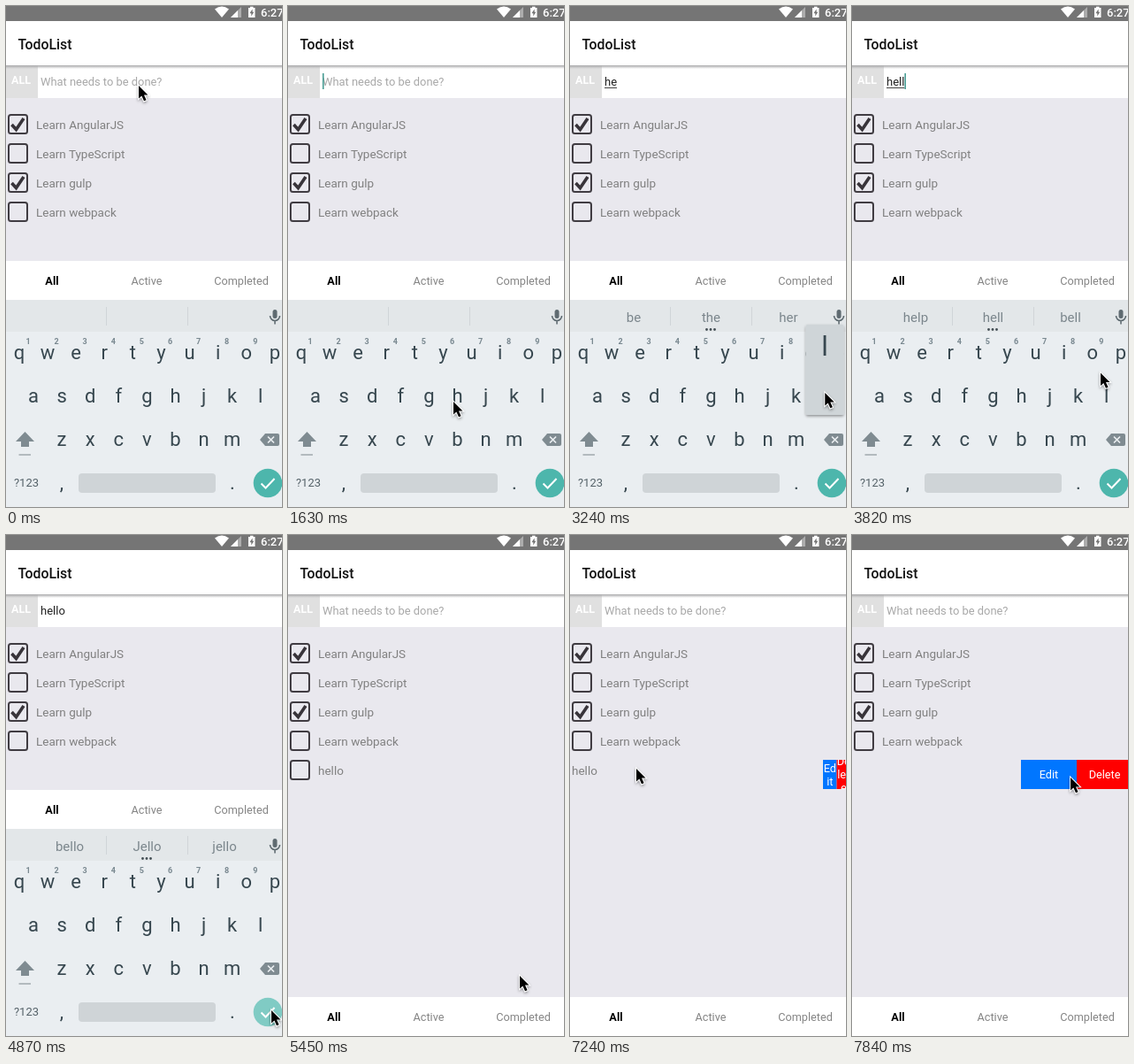
An HTML page for the animation above (7990 ms loop, 312 px wide and 566 px high).

```html
<!DOCTYPE html>
<html lang="en">
<head>
<meta charset="utf-8">
<title>Todo list</title>
<style>
  html, body { margin: 0; width: 100%; height: 100%; overflow: hidden; background: #e9e8ee; }
  svg { display: block; width: 312px; height: 566px; font: 13px Roboto, sans-serif; }
  .mid { text-anchor: middle; }
  .item { font-size: 13.5px; fill: #808080; }
  .key { font-size: 22px; fill: #37474f; text-anchor: middle; }
  .digit { font-size: 9px; font-weight: 700; fill: #78878f; text-anchor: middle; }
  .word { font-size: 15px; fill: #7b868c; text-anchor: middle; }
  .tab { font-size: 12.7px; fill: #858585; text-anchor: middle; }
  .box { fill: none; stroke: #403c42; stroke-width: 2; }
  .tick { fill: none; stroke: #38343a; stroke-width: 3.6; }
  .button { font-size: 12.7px; fill: #fff; text-anchor: middle; }
  #pointer { stroke: #fff; stroke-width: 1.8; paint-order: stroke; }
</style>
</head>
<body>
<svg viewBox="0 0 312 566">
  <defs>
    <clipPath id="rowClip"><rect y="254" width="312" height="33"/></clipPath>
    <filter id="shade" x="-30%" y="-30%" width="160%" height="160%">
      <feDropShadow dx="0" dy="1.5" stdDeviation="1.5" flood-opacity=".4"/>
    </filter>
    <linearGradient id="edge" x2="0" y2="1">
      <stop stop-color="#a9a9ab"/><stop offset="1" stop-color="#a9a9ab" stop-opacity="0"/>
    </linearGradient>
  </defs>

  <rect width="312" height="566" fill="#e9e8ee"/>

  <rect width="312" height="17" fill="#757575"/>
  <g fill="#fff">
    <path d="M244 13L236 3.4Q244-2.6 252 3.4Z"/>
    <path d="M254 13L266 1V13Z" opacity=".4"/>
    <path d="M254 13L262 5V13Z"/>
    <path d="M274 2h2V.8h3.5V2h2v11H274Z"/>
    <path d="M278.6 3.6L275.4 8.2h1.9v3.4l3-4.8h-1.7Z" fill="#757575"/>
    <text x="288" y="12" font-weight="500">6:27</text>
  </g>

  <rect y="17" width="312" height="50" fill="#fff"/>
  <text x="13.500" y="49" font-size="15.800" font-weight="500" fill="#111">TodoList</text>

  <rect y="67" width="36" height="37" fill="#e0e0e0"/>
  <rect x="36" y="67" width="276" height="37" fill="#fff"/>
  <rect y="67" width="312" height="4" fill="url(#edge)"/>
  <text x="6" y="88" font-size="12.500" font-weight="700" fill="#fff">ALL</text>
  <text id="hint" x="39" y="90" font-size="12.900" fill="#a8a8a8">What needs to be done?</text>
  <text id="typed" x="39" y="90" fill="#222"></text>
  <rect id="line" x="39" y="92" height="1" fill="#444"/>
  <rect id="caret" y="76" width="1.6" height="18" fill="#4a9e95"/>

  <g id="list"></g>
  <g id="row" clip-path="url(#rowClip)"></g>

  <g id="tabs">
    <rect width="312" height="44" fill="#fff"/>
    <text class="tab" x="52" y="27" style="fill:#000;font-weight:700">All</text>
    <text class="tab" x="159" y="27">Active</text>
    <text class="tab" x="266" y="27">Completed</text>
  </g>

  <g id="keyboard">
    <rect y="332" width="312" height="234" fill="#eaeef1"/>
    <rect y="332" width="312" height="36" fill="#e3e7e9"/>
    <path d="M113.5 340v21M205.5 340v21" stroke="#d0d5d8"/>
    <g id="words"></g>
    <g fill="none" stroke="#5f6b71" stroke-width="1.6">
      <rect x="301.5" y="343" width="5" height="10" rx="2.5" fill="#5f6b71" stroke="none"/>
      <path d="M298.5 350a5.5 5.5 0 0 0 11 0M304 355.5v4"/>
    </g>
    <g id="keys"></g>
    <path d="M21.5 481L32 492h-6v6h-9v-6h-6Z" fill="#7f8b91"/>
    <path d="M14.5 507h13.500" stroke="#a0a9ae" stroke-width="1.5"/>
    <path d="M287 490l6-7h14a2 2 0 0 1 2 2v10a2 2 0 0 1-2 2h-14Z" fill="#7f8b91"/>
    <path d="M296 486.500l7 7m0-7l-7 7" stroke="#eaeef1" stroke-width="1.7"/>
    <text class="mid" x="23" y="543" fill="#546168">?123</text>
    <rect x="82" y="528" width="155" height="22" rx="4" fill="#cfd4d7"/>
    <circle id="enter" cx="296" cy="539" r="16.300"/>
    <path d="M288.500 539.500l5 5 10-10.500" fill="none" stroke="#fff" stroke-width="2"/>
  </g>

  <g id="popup">
    <rect width="43" height="102" rx="2" fill="#cfd5d8" filter="url(#shade)"/>
    <text id="big" class="mid" x="21.500" y="35" font-size="31" fill="#37474f"></text>
  </g>

  <path id="pointer" d="M0 0V14.500L3.400 11.400L6 17.300L8.600 16.200L6 10.400H10.500Z" filter="url(#shade)"/>
</svg>

<script>
const LOOP = 7990, STEP = 147.5, LAST = 53;
const $ = id => document.getElementById(id);
const show = (id, on) => $(id).setAttribute("visibility", on ? "visible" : "hidden");
const set = (id, attrs) => { for (const k in attrs) $(id).setAttribute(k, attrs[k]); };
const label = (cls, x, y, s) => `<text class="${cls}" x="${x}" y="${y}">${s}</text>`;

// Each cue is [step, value]; it holds until the next one.
const typing = [[0, ""], [14, "h"], [19, "he"], [23, "hel"], [25, "hell"], [29, "hello"], [34, ""]];
const presses = [[0, ""], [12, "h"], [14, ""], [17, "e"], [19, ""], [22, "l"], [23, ""],
                 [24, "l"], [25, ""], [27, "o"], [29, ""]];
const carets = [[0, 0], [3, 1], [6, 0], [10, 1], [13, 0], [16, 1], [20, 0], [24, 1], [31, 0]];
const reveals = [[0, 0], [49, 31], [50, 86], [51, 126]];
const guesses = {
  h: ["he", "h", "how"], he: ["be", "the", "her"], hel: ["help", "hel", "held"],
  hell: ["help", "hell", "bell"], hello: ["bello", "Jello", "jello"]
};
const route = [[0, 150, 90], [1, 149, 104], [4, 145, 270], [8, 150, 456], [9, 166, 454], [11, 187, 447],
  [14, 187, 447], [17, 80, 392], [18, 80, 392], [21, 288, 437], [25, 289, 437], [27, 273, 392],
  [30, 273, 392], [31, 300, 537], [35, 300, 537], [37, 262, 498], [40, 262, 546], [42, 240, 480],
  [46, 150, 290], [48, 120, 261], [49, 75, 264], [50, 66, 266], [51, 125, 270], [52, 205, 273], [53, 247, 274]];

const cue = (list, i) => list.filter(c => c[0] <= i).pop()[1];

function pointerAt(i) {
  const n = route.findIndex(p => p[0] >= i);
  const b = route[n], a = route[Math.max(0, n - 1)];
  const f = b[0] === a[0] ? 0 : (i - a[0]) / (b[0] - a[0]);
  return [1, 2].map(k => a[k] + (b[k] - a[k]) * f);
}

const keyPos = {};
const PITCH = 32.1;
$("keys").innerHTML = ["qwertyuiop", "asdfghjkl", "zxcvbnm"].map((letters, r) =>
  [...letters].map((c, n) => {
    const x = [15, 31, 63][r] + n * PITCH, y = 399 + r * 49;
    keyPos[c] = [x, y];
    const digit = r === 0 && n < 9 ? label("digit", x + 10, 382, n + 1) : "";
    return label("key", x, y, c) + digit;
  }).join("")).join("") + label("key", 63, 546, ",") + label("key", 256, 546, ".");

function todo(name, n, done) {
  const y = 122 + n * 33;
  const tick = done ? `<path class="tick" d="M6.500 ${y + 12}l5 5.500 8.500-12.500"/>` : "";
  return `<rect class="box" x="3" y="${y + 1}" width="21" height="21" rx="2.500"/>` +
    tick + label("item", 34, y + 17, name);
}
$("list").innerHTML = ["AngularJS", "TypeScript", "gulp", "webpack"]
  .map((s, n) => todo("Learn " + s, n, n % 2 === 0)).join("");

// A narrow button breaks its word where the parts say.
function button(parts, x, w, fill) {
  const lines = w < 40 ? parts : [parts.join("")];
  const top = 275 - (lines.length - 1) * 7.5;
  return `<rect x="${x}" y="254" width="${w}" height="33" fill="${fill}"/>` +
    lines.map((s, n) => label("button", x + w / 2, top + n * 15, s)).join("");
}

function swipeRow(reveal) {
  if (!reveal) return todo("hello", 4, false);
  const w = reveal / 2, x = 317 - reveal;
  return label("item", 33 - reveal, 271, "hello") +
    button(["Ed", "it"], x, w, "#0076ff") + button(["De", "let", "e"], x + w, w, "#f00");
}

function draw(i) {
  const text = cue(typing, i), key = cue(presses, i), open = i < 35;

  $("typed").textContent = text;
  const width = text ? $("typed").getComputedTextLength() : 0;
  show("hint", !text);
  set("line", { width: i < 33 ? width : 0 });
  set("caret", { x: 39 + width });
  show("caret", cue(carets, i));

  $("row").innerHTML = i >= 34 ? swipeRow(cue(reveals, i)) : "";
  set("tabs", { transform: `translate(0 ${open ? 288 : 522})` });

  show("keyboard", open);
  $("words").innerHTML = !text ? "" :
    guesses[text].map((s, n) => label("word", 72 + n * 87.5, 357, s)).join("") +
    [154.5, 159, 163.5].map(x => `<circle cx="${x}" cy="365.5" r="1.4" fill="#444f55"/>`).join("");
  set("enter", { fill: i === 33 ? "#80cbc4" : "#4db6ac" });

  show("popup", key);
  if (key) {
    const [x, y] = keyPos[key];
    $("big").textContent = key;
    set("popup", { transform: `translate(${x - 21.3} ${y - 88})` });
  }
  set("pointer", { transform: `translate(${pointerAt(i)})` });
}

let shown = -1;
const start = performance.now();
function tick() {
  const t = Math.max(0, performance.now() - start) % LOOP;
  const i = Math.min(LAST, Math.floor(t / STEP + .1));
  if (i !== shown) draw(shown = i);
  requestAnimationFrame(tick);
}
tick();
</script>
</body>
</html>
```
